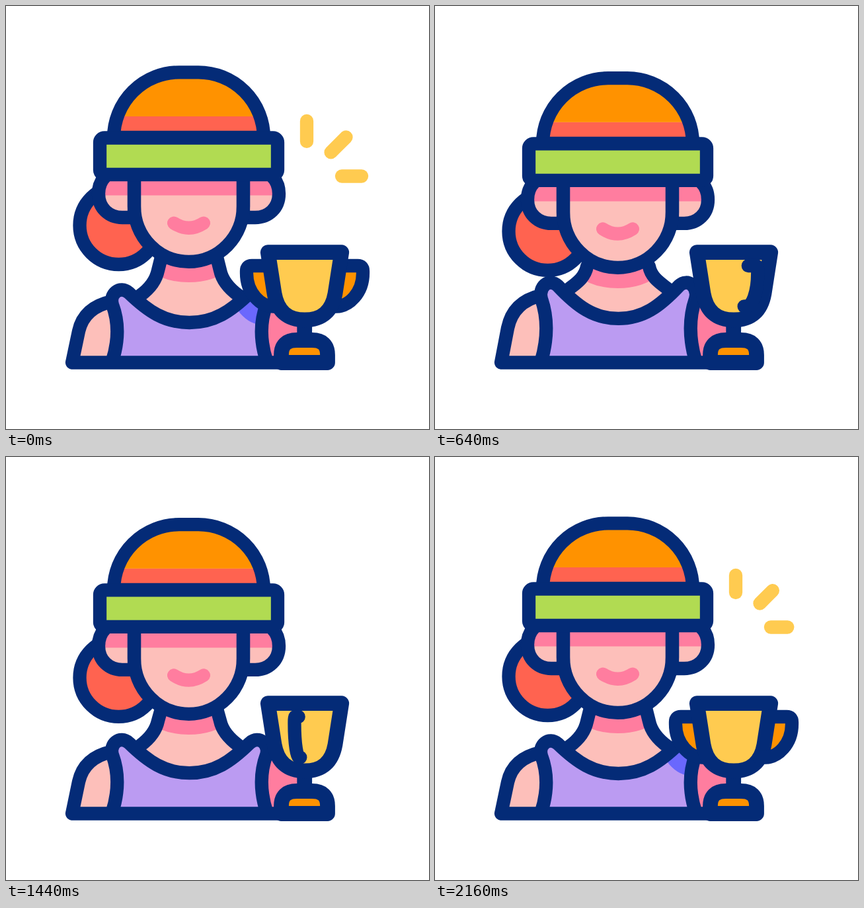
Recreate the animation shown at these times as an HTML page. Size 640 by 640 pixels, loop 2.2 s.

```html
<!DOCTYPE html>
<html lang="en">
<head>
<meta charset="utf-8">
<title>Athlete with trophy</title>
<style>
  html, body { margin: 0; width: 100%; height: 100%; overflow: hidden; background: #fff; }
  svg { display: block; width: 100vw; height: 100vh; }
  .line { fill: none; stroke: #042b77; stroke-width: 20.3; stroke-linecap: round; stroke-linejoin: round; }
  .thick { stroke-width: 22.8; }
  .skin { fill: #fdbfba; }
  .pink { fill: #ff7d9f; }
  .red { fill: #ff6350; }
  .orange { fill: #ff9200; }
  .yellow { fill: #ffcb50; }
  .green { fill: #b1db52; }
  .shirt { fill: #bb9bf2; }
  .shade { fill: #6a68fd; stroke: #6a68fd; stroke-width: 20; }
  .ray { stroke: #ffcb50; stroke-width: 20.3; stroke-linecap: round; }
</style>
</head>
<body>
<svg viewBox="0 0 640 640">
  <defs>
    <clipPath id="shirtClip"><path id="shirtArea"/></clipPath>
    <clipPath id="neckClip"><path id="neckArea"/></clipPath>
    <path id="dome" d="M163 199A99 99 0 0 1 262 100.300H291A99 99 0 0 1 390 199Z"/>
    <path id="ear" d="M150 258Q140 268 140 284C140 306 156 320 176 320H194V258"/>
    <path id="face" d="M194 256V303A82.5 84 0 0 0 359 303V256"/>
    <clipPath id="domeClip"><use href="#dome"/></clipPath>
  </defs>

  <g id="rays"></g>

  <g id="bun"><circle class="line" style="fill:#ff6350" cx="170.500" cy="332" r="59"/></g>

  <path id="neck" class="skin"/>
  <g clip-path="url(#neckClip)"><path id="chin" class="pink" d="M215 340H338V398Q315 418 276.5 418Q238 418 215 398Z"/></g>
  <path id="arm" class="skin"/>
  <path id="farArm" class="pink"/>
  <path id="shirt" class="shirt"/>
  <g clip-path="url(#shirtClip)"><path id="shade" class="shade" transform="translate(-15 18)"/></g>
  <path id="bodyLines" class="line"/>

  <g id="head">
    <use href="#ear" class="skin"/>
    <use href="#ear" class="skin" transform="matrix(-1 0 0 1 553 0)"/>
    <use href="#face" class="skin"/>
    <path class="pink" d="M150 286.5Q149 268 160 256H393Q404 268 403 286.5Z"/>
    <use href="#ear" class="line"/>
    <use href="#ear" class="line" transform="matrix(-1 0 0 1 553 0)"/>
    <use href="#face" class="line"/>
    <path d="M254 328.5Q276.5 343 299 328.5" fill="none" stroke="#ff7d9f" stroke-width="20" stroke-linecap="round"/>
    <g clip-path="url(#domeClip)">
      <rect class="orange" x="150" y="90" width="250" height="77"/>
      <rect class="red" x="150" y="167" width="250" height="40"/>
    </g>
    <use href="#dome" class="line"/>
    <rect class="green" x="142" y="199.5" width="269" height="55.5"/>
    <rect class="line" x="142" y="199.5" width="269" height="55.5" rx="7"/>
  </g>

  <path id="backFill" class="orange"/>
  <path id="backLine" class="line"/>
  <path id="frontFill" class="orange"/>
  <path class="line thick" d="M451.700 475V505"/>
  <path class="line thick" style="fill:#ff9200" d="M416.500 539.500V528Q416.500 505.500 440 505.500H463Q486.500 505.500 486.500 528V539.500Z"/>
  <path class="line thick" style="fill:#ffcb50" d="M396.300 372.700H507.700L498 435Q491 475 452 475Q413 475 406 435Z"/>
  <path id="frontLine" class="line"/>
</svg>
<script>
const LOOP = 2200;
const el = id => document.getElementById(id);
const clamp = v => Math.min(1, Math.max(0, v));
const ease = u => u * u * (3 - 2 * u);
const ramp = (t, from, length) => clamp((t - from) / length);

const headKeys = [[0, 0], [450, 30], [900, -24.5], [1235, 30], [1570, -12], [2020, 0]];
const shoulderKeys = [[0, 0], [340, 12.5], [680, -13], [1200, 11], [1560, -6], [2000, 0]];

function track(keys, t) {
  for (let i = 1; i < keys.length; i++) {
    const [t0, v0] = keys[i - 1], [t1, v1] = keys[i];
    if (t < t1) return v0 + (v1 - v0) * ease((t - t0) / (t1 - t0));
  }
  return keys[keys.length - 1][1];
}

// Inner and outer end of each ray.
const rays = [[455, 205, 455, 174], [491.5, 221.5, 514.5, 198.5], [508, 257.5, 538, 257.5]].map(ends => {
  const node = document.createElementNS("http://www.w3.org/2000/svg", "line");
  node.setAttribute("class", "ray");
  el("rays").append(node);
  return { node, ends };
});

function drawRays(t) {
  let start = 0, end = 0;
  if (t < 600) { start = ramp(t, 0, 360); end = 1; }
  else if (t < 1600) { start = ramp(t, 1057, 360); end = ramp(t, 778, 394); }
  else end = ramp(t, 1824, 400);
  el("rays").style.display = end > start ? "" : "none";
  for (const { node, ends: [x0, y0, x1, y1] } of rays) {
    const set = (n, u) => {
      node.setAttribute("x" + n, x0 + (x1 - x0) * u);
      node.setAttribute("y" + n, y0 + (y1 - y0) * u);
    };
    set(1, start);
    set(2, end);
  }
}

function drawBody(h, d) {
  const floor = 539.5, mirror = 555;
  const k = (121 - d) / 121;
  const low = y => floor - (floor - y) * k;
  const p = (x, y) => `${x} ${low(y)} `;
  const m = (x, y) => p(mirror - x, y);

  const neckline = `C${p(215, 462)}${p(240, 479)}${p(mirror / 2, 479)}C${m(240, 479)}${m(215, 462)}${m(186, 434)}`;
  const strapL = `M${p(160, floor)}Q${p(176, 492)}${p(161, 452)}C${p(156, 436)}${p(172, 422)}${p(186, 434)}`;
  const strapR = `C${m(172, 422)}${m(156, 436)}${m(161, 452)}Q${m(176, 492)}${m(160, floor)}`;
  const shirt = strapL + neckline + strapR;

  // The neck drops straight from the head, then bends out to the strap.
  const top = 372 + h, bend = 400 - 0.1 * h + 0.4 * d;
  const neckL = `M237 ${top}L230 ${bend}C226.500 ${bend + 17} ${p(214, 430)}${p(203, 438)}`;
  const neckR = `M317 ${top}L324 ${bend}C327.500 ${bend + 17} ${m(214, 430)}${m(203, 438)}`;
  const neck = `${neckL}L${p(186, 434)}${neckline}L${m(203, 438)}` +
    `C${m(214, 430)}327.500 ${bend + 17} 324 ${bend}L317 ${top}Z`;

  const arm = `M${p(100, floor)}L${p(110, 492)}Q${p(118, 456)}${p(160, 447)}`;
  const put = (id, path) => el(id).setAttribute("d", path);
  put("neck", neck);
  put("neckArea", neck);
  put("shirt", shirt + "Z");
  put("shirtArea", shirt + "Z");
  put("arm", `${arm}Q${p(176, 492)}${p(160, floor)}Z`);
  put("farArm", `M${m(160, floor)}Q${m(176, 492)}${m(161, 450)}L420 455L450 475V${floor}Z`);
  put("bodyLines", `${neckL}${neckR}${shirt}${arm}M${m(160, 447)}L${m(148, 450)}M100 ${floor}H416`);
  for (const id of ["head", "bun", "chin"]) el(id).setAttribute("transform", `translate(0 ${h})`);
}

// Handle outline; s = -1 is fully left of the cup, 1 fully right.
function handle(s) {
  const x = v => 452 + v * s;
  return `M${x(53)} 393H${x(80)}Q${x(88)} 393 ${x(88)} 401V404` +
    `C${x(88)} 435 ${x(66)} 454.500 ${x(48)} 454.500H${x(38)}`;
}

function drawHandles(t) {
  const turn = t < 1000 ? t / 1000 : ramp(t, 1000, 1000);
  const s = 2 * ease(turn) - 1;
  for (const part of ["Fill", "Line"]) {
    el("front" + part).setAttribute("d", handle(s));
    el("back" + part).setAttribute("d", handle(-s));
  }
  el("shade").setAttribute("d", handle(-Math.abs(s)));
}

function draw(t) {
  drawRays(t);
  drawBody(track(headKeys, t), track(shoulderKeys, t));
  drawHandles(t);
}

const begin = performance.now();
function tick() {
  draw((performance.now() - begin) % LOOP);
  requestAnimationFrame(tick);
}
draw(0);
requestAnimationFrame(tick);
</script>
</body>
</html>
```
